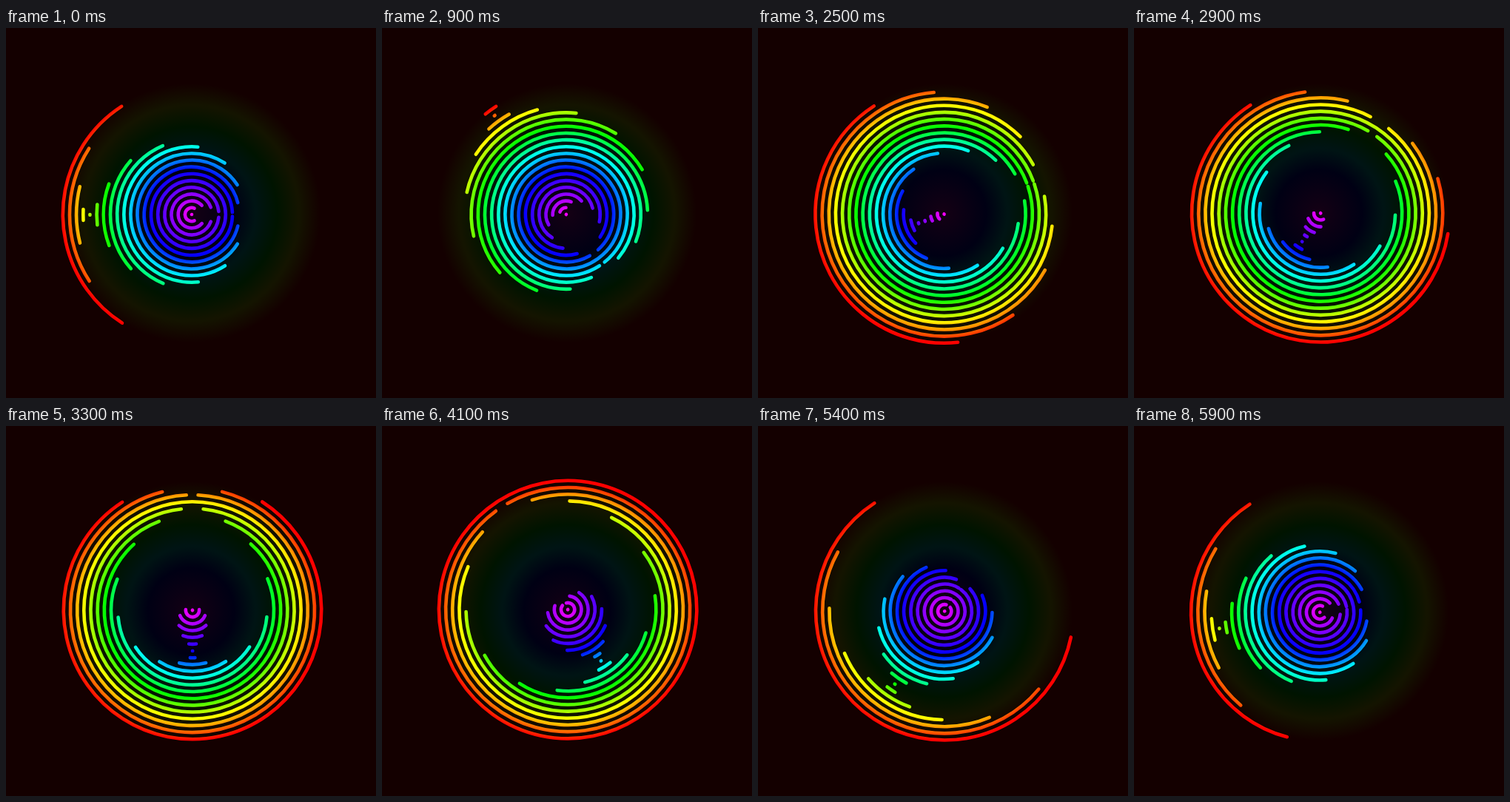
These frames come from a looping animation (500x500 px, 6000 ms). An HTML page with a canvas:

```html
<!DOCTYPE html>
<html lang="en">
<head>
<meta charset="utf-8">
<title>Rainbow arcs</title>
<style>
  html, body { margin: 0; width: 100%; height: 100%; overflow: hidden; background: #000; }
  canvas { display: block; }
</style>
</head>
<body>
<canvas id="stage" width="500" height="500"></canvas>
<script>
const ctx = document.getElementById('stage').getContext('2d');
const LOOP = 6000, STEP = 100;
const RINGS = 20, GAP = 9.17;
const RAD = Math.PI / 180;
const cosDeg = a => Math.cos(a * RAD);

const rainbow = ctx.createRadialGradient(0, 0, 0, 0, 0, 175);
[[0, '#f0f'], [1 / 3, '#00f'], [1 / 2, '#0ff'], [2 / 3, '#0f0'], [5 / 6, '#ff0'], [1, '#f00']]
  .forEach(([at, color]) => rainbow.addColorStop(at, color));

function draw(time) {
  const phase = time / LOOP * 360 - 68.6;
  const heading = 213 - 90 * cosDeg(phase);

  ctx.setTransform(1, 0, 0, 1, 250, 250);
  ctx.fillStyle = '#000';
  ctx.fillRect(-250, -250, 500, 500);
  ctx.globalAlpha = 0.08;
  ctx.fillStyle = rainbow;
  ctx.fillRect(-250, -250, 500, 500);
  ctx.globalAlpha = 1;

  ctx.rotate(-heading * RAD);
  ctx.strokeStyle = rainbow;
  ctx.lineWidth = 4.6;
  ctx.lineCap = 'round';
  for (let i = 0; i < RINGS; i++) {
    // each ring inward runs 18 degrees ahead of its neighbour
    const spread = 90 - 90 * cosDeg(phase + 18 * (RINGS - 1 - i));
    const half = Math.max(spread * RAD, 0.002);
    ctx.beginPath();
    ctx.arc(-1, -2, Math.max(i * GAP, 0.05), -half, half);
    ctx.stroke();
  }
}

const start = performance.now();
let shown = -1;

function tick() {
  const elapsed = (performance.now() - start) % LOOP;
  const time = Math.floor(elapsed / STEP) * STEP;
  if (time !== shown) draw(shown = time);
  requestAnimationFrame(tick);
}
tick();
</script>
</body>
</html>
```
